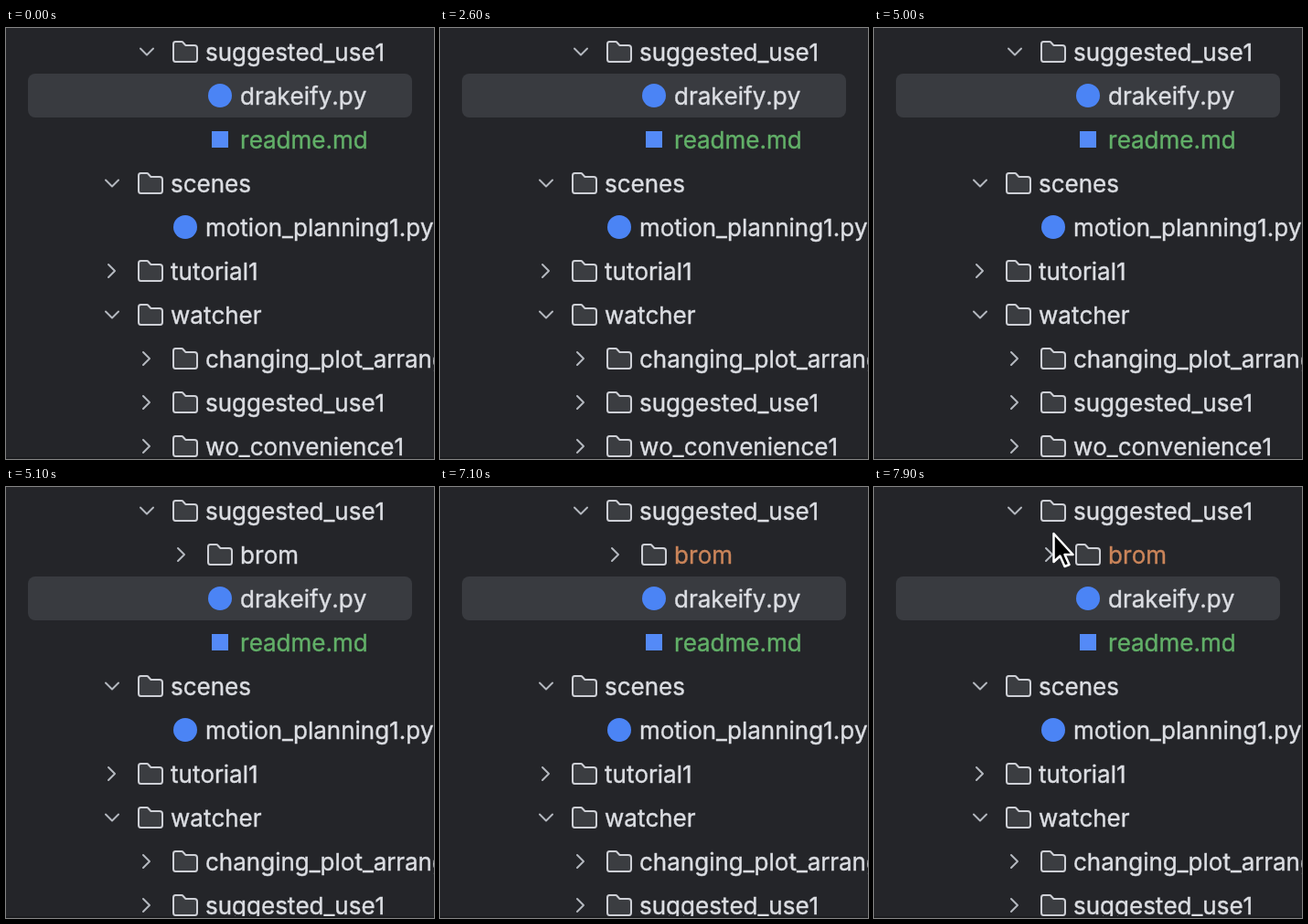
Animation of 468x472 px, one loop 8 s. Source, as an HTML page:

```html
<!DOCTYPE html>
<html lang="en">
<head>
<meta charset="utf-8">
<style>
  html, body { margin: 0; height: 100%; overflow: hidden; background: #242529; }
  svg { display: block; color: #dcdee3; }
  text {
    font: 26px Inter, "Open Sans", sans-serif;
    font-kerning: none; font-variant-ligatures: none;
    fill: currentColor; stroke: currentColor; stroke-width: 0.4;
  }
  .line { fill: none; stroke: #b4b8bf; stroke-width: 2; stroke-linecap: round; stroke-linejoin: round; }
  .folder { fill: #3b3d41; stroke: #ced0d6; stroke-width: 2; }
</style>
</head>
<body>
<svg id="stage" width="468" height="472" viewBox="0 0 468 472">
  <g id="top"></g>
  <g id="fresh"></g>
  <g id="rest"><rect x="24" y="50" width="420" height="48" rx="8" fill="#393b40"/></g>
  <rect y="470" width="468" height="2" fill="#1c1d20"/>
  <path id="cursor" d="M0 0V31L7 24.500L12 36L17 34L12 23H21Z" fill="#000" stroke="#fff" stroke-width="2.500" stroke-linejoin="round"/>
</svg>
<script>
const LOOP = 8000, STEP = 100, ROW = 48;
const ADDED = 5100, TINTED = 5900, ENTER = 7400, ARRIVE = 7900;
const $ = id => document.getElementById(id);

const chevrons = { open: "M-7 -3.500L0 3.500L7 -3.500", closed: "M-4 -7L3 0L-4 7" };
const folder = "M0.200 -7.300L0.500 -7H10Q13 -7 13 -4V8.300Q13 11 10.700 11H-10.700Q-13 11 -13 8.300V-8.300Q-13 -11 -10.700 -11H-3.800Q-3.300 -11 -3 -10.700Z";
const icons = {
  py: '<circle r="13" fill="#4b84f5"/>',
  md: '<rect x="-9" y="-9" width="18" height="18" fill="#548af7"/>'
};

// x is the left edge of the label, row counts from the top of the stage
function addRow(parent, row, x, kind, label, color = "") {
  const icon = icons[kind] ||
    `<path class="line" d="${chevrons[kind]}" transform="translate(-42)"/><path class="folder" d="${folder}"/>`;
  $(parent).insertAdjacentHTML("beforeend",
    `<g transform="translate(${x - 22} ${26 + row * ROW})">${icon}
     <text x="22" y="10" style="color:${color}">${label}</text></g>`);
}

addRow("top", 0, 218, "open", "suggested_use1");
addRow("fresh", 1, 256, "closed", "brom");
[
  [256, "py", "drakeify.py"],
  [256, "md", "readme.md", "#62b068"],
  [180, "open", "scenes"],
  [218, "py", "motion_planning1.py"],
  [180, "closed", "tutorial1"],
  [180, "open", "watcher"],
  [218, "closed", "changing_plot_arrangement"],
  [218, "closed", "suggested_use1"],
  [218, "closed", "wo_convenience1"]
].forEach((item, i) => addRow("rest", i + 1, ...item));

const freshText = $("fresh").querySelector("text");

function draw(now) {
  const t = Math.floor(now % LOOP / STEP) * STEP;
  const added = t >= ADDED;
  $("fresh").style.display = added ? "" : "none";
  $("rest").setAttribute("transform", `translate(0 ${added ? ROW : 0})`);
  freshText.style.color = t >= TINTED ? "#cb855a" : "";

  const p = Math.min(1, (t - ENTER) / (ARRIVE - ENTER));
  const left = (1 - p) ** 2;
  $("cursor").style.display = p >= 0 ? "" : "none";
  $("cursor").setAttribute("transform", `translate(${196.5 + 100 * left} ${51 - 76 * left})`);
}

const start = performance.now();
function frame() {
  draw(performance.now() - start);
  requestAnimationFrame(frame);
}
frame();
</script>
</body>
</html>
```
